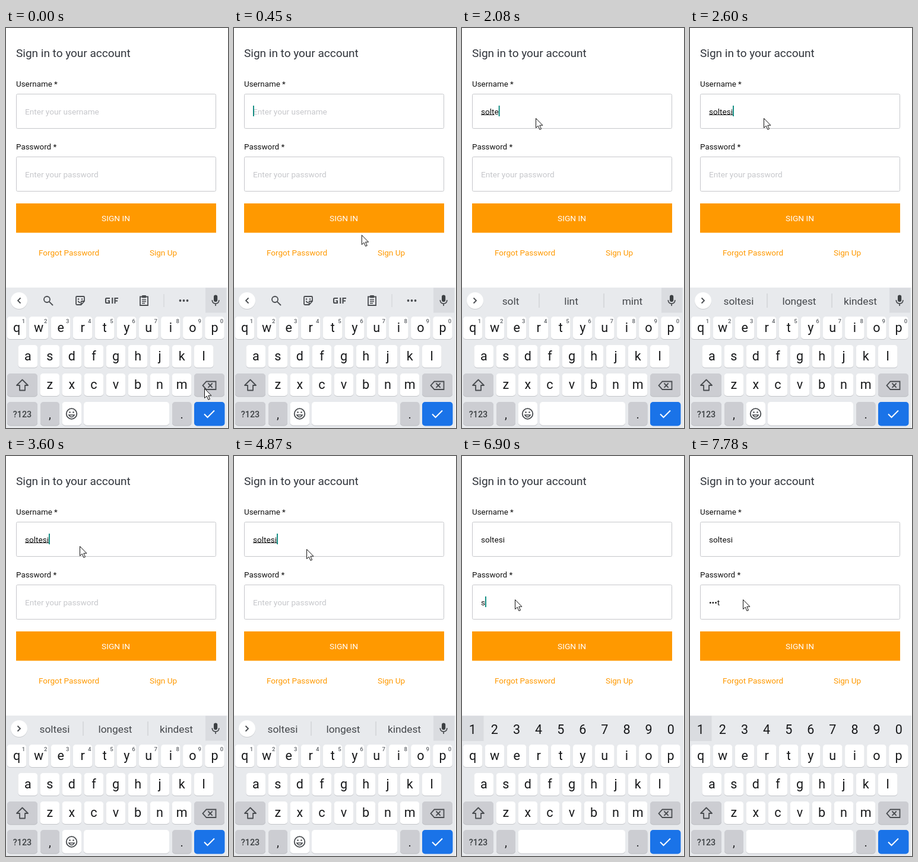
Recreate the animation shown at these times as an HTML page. Size 374x675 px, loop 8 s.

```html
<!DOCTYPE html>
<html lang="en">
<head>
<meta charset="utf-8">
<title>Sign in</title>
<style>
html, body { margin: 0; width: 100%; height: 100%; overflow: hidden; background: #fff; }
svg { display: block; font-family: Roboto, sans-serif; }
.line { fill: none; stroke: #494c50; stroke-width: 1.8; }
</style>
</head>
<body>
<svg id="stage" width="374" height="675" viewBox="0 0 374 675"></svg>
<script>
const NAME = 'soltesi', LOOP = 8000;
const INK = '#202124', GREY = '#c6c7cb', ORANGE = '#ff9900', CARET = '#00857a';

const rect = (x, y, w, h, fill, extra = '') =>
  `<rect x="${x}" y="${y}" width="${w}" height="${h}" fill="${fill}" ${extra}/>`;
const text = (x, y, size, fill, s, extra = '') =>
  `<text x="${x}" y="${y}" font-size="${size}" fill="${fill}" ${extra}>${s}</text>`;
const mid = (x, y, size, fill, s, extra = '') =>
  text(x, y, size, fill, s, 'text-anchor="middle" ' + extra);
const path = (d, extra = '') => `<path class="line" d="${d}" ${extra}/>`;
const group = (id, body) => `<g id="${id}">${body}</g>`;
const key = (x, y, w, h, fill = '#fff') =>
  rect(x, y + 1, w, h, fill === '#fff' ? '#c3c5c9' : '#b9bbc0', 'rx="5"') + rect(x, y, w, h, fill, 'rx="5"');
const keyRow = (letters, x, y) => [...letters].map((c, i) =>
  key(x + 37.05 * i - 16.3, y, 32.6, 38) + mid(x + 37.05 * i, y + 26, 21.5, '#17181a', c)).join('');
const row = (chars, x, y, size, fill, extra) =>
  [...chars].map((c, i) => mid(x + 37.1 * i, y, size, fill, c, extra)).join('');

const field = (id, y, label) =>
  text(17, y - 12, 13.4, '#111', label) +
  rect(17.5, y + .5, 336, 58, '#fff', `rx="2" stroke="${GREY}"`) +
  text(32, y + 34.5, 13.6, '#111', '', `id="${id}Text"`) +
  rect(32, y + 20, 1.8, 18, CARET, `id="${id}Caret"`);

const form =
  text(17, 48.5, 19, '#30343b', 'Sign in to your account') +
  field('user', 111, 'Username *') + rect(32, 146, 0, 1, '#222', 'id="underline"') +
  field('pass', 217, 'Password *') +
  rect(17, 296, 337, 49.5, ORANGE) +
  mid(185, 326, 13.7, '#fff', 'SIGN IN') +
  mid(106, 384, 13.5, ORANGE, 'Forgot Password') +
  mid(265, 384, 13.5, ORANGE, 'Sign Up');

const round = '<circle cx="22" cy="461" r="14" fill="#c9cbcf"/><circle cx="22" cy="460" r="14" fill="#fff"/>';
const tools = round + path('M24.5 455.5L20 460L24.5 464.5') +
  '<circle class="line" cx="69" cy="458" r="5"/>' + path('M72.8 461.8L79 468', 'stroke-width="2.2"') +
  path('M119.5 453H130.5Q132 453 132 454.5V461L126.5 467H119.5Q118 467 118 465.5V454.5Q118 453 119.5 453ZM132 461H128Q126.5 461 126.5 462.5V467M121.5 460.5Q122.5 463.5 125 463.3') +
  '<circle cx="122" cy="457.5" r="1.2" fill="#494c50"/><circle cx="128" cy="457.5" r="1.2" fill="#494c50"/>' +
  path('M175 456H169.5Q168 456 168 457.5V462.5Q168 464 169.5 464H174V460.5H171.5M179.2 455V465M189 456H183.5V465M183.5 460.5H188', 'style="stroke-width:2.1"') +
  path('M226 453.5H239V468H226Z') + rect(229, 451, 7, 4.5, '#494c50', 'rx="1"') +
  path('M229 458.5H236M229 461.5H236M229 464.5H234', 'style="stroke-width:1.4"') +
  rect(265.5, 449, 1, 22, '#cfd1d5') +
  [293.5, 299.5, 305.5].map(x => `<circle cx="${x}" cy="460" r="1.9" fill="#494c50"/>`).join('');
const words = round + path('M19.5 455.5L24 460L19.5 464.5') +
  [82, 184, 287].map((x, i) => mid(x, 466.5, 17.3, '#45484c', '', `id="word${i}"`)).join('') +
  rect(129.5, 448, 1, 24, '#c6c8cc') + rect(238.5, 448, 1, 24, '#c6c8cc');
const mic = rect(336, 438.5, 35, 42, '#dadce0') +
  rect(350, 450.5, 6.2, 11.5, '#3c4043', 'rx="3.1"') +
  path('M347.3 459Q347.5 465 353.1 465Q358.7 465 358.9 459M353.1 465V469', 'style="stroke-width:1.7"');

const keyboard =
  rect(0, 438, 373, 237, '#e8eaed') +
  group('tools', tools) + group('words', words) + group('mic', mic) +
  group('digits', rect(0, 438.5, 36.5, 42.5, '#dadce0', 'id="touch"') + row('1234567890', 17.8, 468.5, 21.5, '#17181a')) +
  keyRow('qwertyuiop', 18, 487) +
  group('hints', row('1234567890', 29.5, 497.5, 9.5, '#5f6368', 'font-weight="500"')) +
  keyRow('asdfghjkl', 36.8, 535) +
  key(2, 583, 51, 38.5, '#cccdd2') + keyRow('zxcvbnm', 73.8, 583) + key(317, 583, 51, 38.5, '#cccdd2') +
  path('M27.5 593.5L37 603H32V611.5H23V603H18Z', 'stroke-linejoin="round"') +
  path('M337.5 596.5H353.5V610H337.5L331.5 603.2ZM340.5 599.5L347.7 606.9M347.7 599.5L340.5 606.9') +
  key(2, 631, 51, 39.5, '#cccdd2') + mid(27.5, 656.5, 14.3, '#3c4043', '?123', 'font-weight="500"') +
  key(58, 631, 32, 39.5, '#cccdd2') + mid(74, 658.5, 20, INK, ',') +
  group('spaceKey', key(94.5, 631, 180.5, 39.5)) +
  group('emoji', key(94.5, 631, 32.5, 39.5) + key(131, 631, 144, 39.5) +
    '<circle class="line" cx="110.5" cy="651" r="8.8"/>' + path('M105.8 653Q110.5 660 115.2 653Z', 'style="stroke-width:1.4"') +
    '<circle cx="107.5" cy="648.5" r="1.3" fill="#494c50"/><circle cx="113.5" cy="648.5" r="1.3" fill="#494c50"/>') +
  key(280, 631, 32.5, 39.5, '#cccdd2') + mid(296.2, 658.5, 20, INK, '.') +
  rect(317, 631, 51.5, 40.5, '#1a73e8', 'rx="5"') +
  path('M334 651.5L339.5 657L351 645.5', 'style="stroke:#fff;stroke-width:2"');

const pointer = '<path id="pointer" d="M0 0V16L3.7 12.6L6.4 18.8L9 17.7L6.3 11.7H11.4Z" fill="#fff" stroke="#111"/>';

const $ = id => document.getElementById(id);
$('stage').innerHTML = form + keyboard + pointer;

const show = (id, on) => $(id).setAttribute('visibility', on ? 'visible' : 'hidden');
const passed = (times, t) => times.filter(at => t >= at).length;
const within = (t, ...spans) => spans.some(([a, b]) => t >= a && t < b);
// Eased pointer travel, advancing in discrete steps
function travel(t, start, gap, steps) {
  const p = Math.min(Math.max(Math.floor((t - start) / gap) + 1, 0), steps) / steps;
  return p * p * (3 - 2 * p);
}

function setInput(id, value, hint, caretOn) {
  const el = $(id + 'Text');
  el.textContent = value || hint;
  el.setAttribute('fill', value ? '#111' : GREY);
  const end = value ? el.getSubStringLength(0, value.length) : 0;
  $(id + 'Caret').setAttribute('x', 32 + end);
  show(id + 'Caret', caretOn);
  return el;
}

function draw(t) {
  const onPassword = t >= 5380;

  const typed = passed([1450, 1700, 1800, 1900, 2080, 2210, 2330], t);
  const user = setInput('user', NAME.slice(0, typed), 'Enter your username',
    within(t, [60, 570], [1070, 3100], [3600, 4100], [4550, 5380]));
  const marked = onPassword ? 0 : t >= 2600 ? 7 : t >= 1900 ? 4 : t >= 1700 ? 1 : 0;
  $('underline').setAttribute('width', marked ? user.getSubStringLength(0, marked) : 0);

  const secret = passed([6900, 7030, 7150, 7280], t);
  setInput('pass', secret ? '•'.repeat(secret - 1) + NAME[secret - 1] : '', 'Enter your password',
    within(t, [5380, 5900], [6400, 7780]));

  const suggesting = t >= 1900 && !onPassword;
  const list = t >= 2600 ? [NAME, 'longest', 'kindest']
    : t >= 2330 ? [NAME.slice(0, 5), 'linter', 'minted'] : [NAME.slice(0, 4), 'lint', 'mint'];
  list.forEach((w, i) => $('word' + i).textContent = w);
  show('tools', t < 1900);
  show('words', suggesting);
  for (const id of ['mic', 'hints', 'emoji']) show(id, !onPassword);
  for (const id of ['digits', 'spaceKey']) show(id, onPassword);
  $('touch').setAttribute('opacity', Math.min(1, .25 + Math.max(0, t - 5380) / 2000));

  const a = travel(t, 60, 71, 11), b = travel(t, 4870, 73, 7);
  $('pointer').setAttribute('transform',
    `translate(${334.5 - 210 * a - 35 * b} ${608.5 - 456 * a + 90 * b})`);
}

function tick() {
  draw(performance.now() % LOOP);
  requestAnimationFrame(tick);
}
tick();
</script>
</body>
</html>
```
